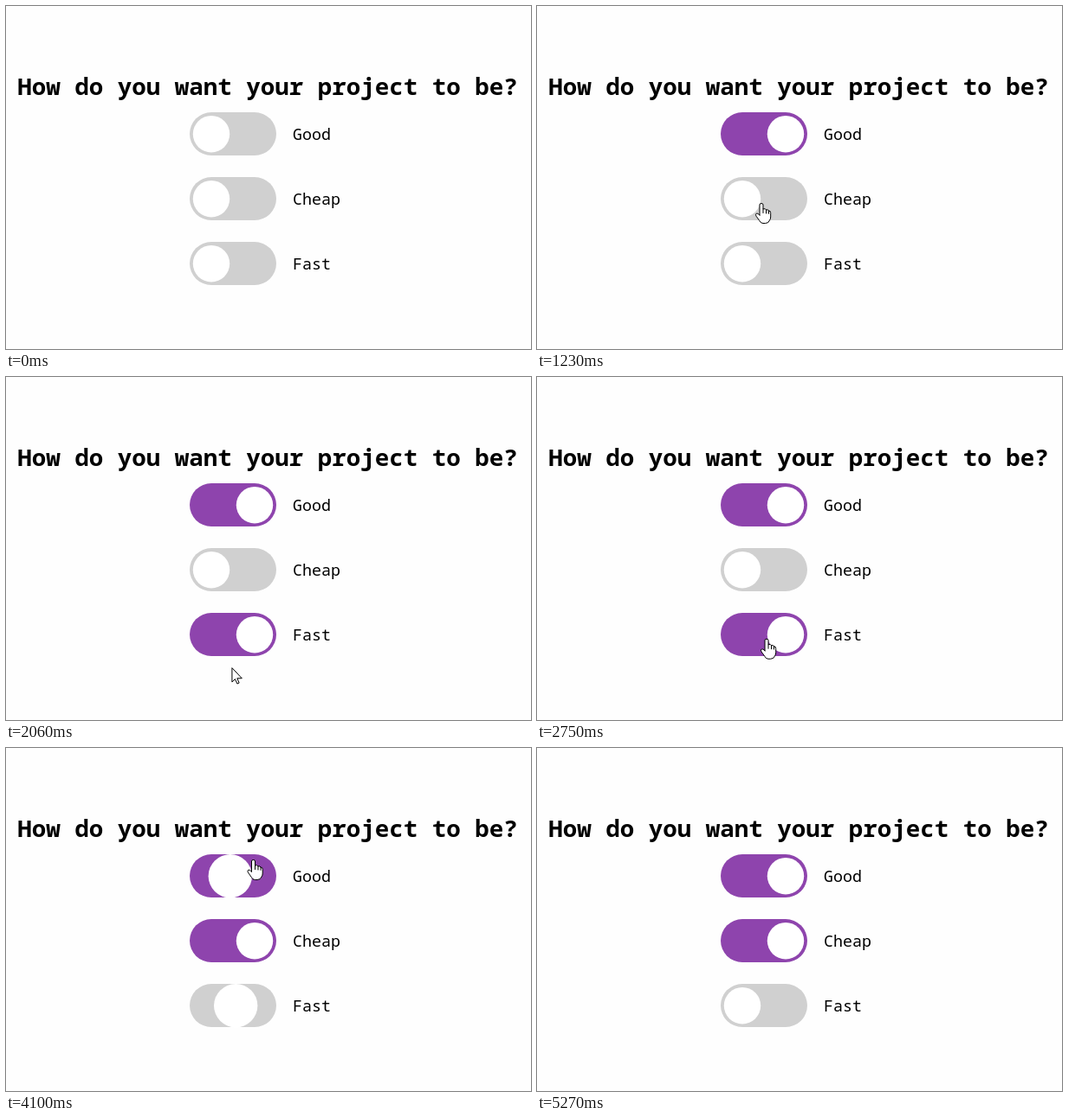
Write an HTML page that moves like this. It is 606 px wide and 397 px high and loops after 5860 ms.

```html
<!DOCTYPE html>
<html lang="en">
<head>
<meta charset="utf-8">
<title>Pick two</title>
<style>
  html, body { margin: 0; width: 100%; height: 100%; overflow: hidden; background: #fefefe; }
  svg { display: block; }
  text { font: 18.33px "Noto Sans Mono", "DejaVu Sans Mono", monospace; }
  .title { font-size: 27.5px; font-weight: 600; }
  #cursor path { fill: #fff; stroke: #000; stroke-linejoin: round; stroke-linecap: round; }
</style>
</head>
<body>
<svg width="606" height="397">
  <text class="title" x="13.2" y="103">How do you want your project to be?</text>
  <g id="toggles"></g>
  <g id="cursor">
    <path id="arrow" d="M.5 .5V16.5L4 13L6.5 18.5L8.7 17.5L6.4 12.2H11.5Z"/>
    <path id="hand" d="M-2 14V2Q-2 .5 0 .5T2 2V7Q4.8 5.8 5.5 8Q8 7 8.5 9.2Q10.7 8.6 10.7 11.5V16
      Q10.7 18.5 9.5 20Q8.5 23.5 4.5 23.5H2Q-1 23.5-2.2 20.5L-6 15.2Q-7.2 13-5.8 12.2Q-4.5 11.3-2 14Z
      M2 7V11.5M5.5 8V12M8.5 9.2V12.3"/>
  </g>
</svg>
<script>
const LOOP = 5860, SLIDE = 300, LEFT = 212, WIDTH = 100, HEIGHT = 50;
const ON = '#8e44ad', OFF = '#d0d0d0';
const $ = id => document.getElementById(id);

function add(tag, attrs) {
  const el = document.createElementNS('http://www.w3.org/2000/svg', tag);
  for (const key in attrs) el.setAttribute(key, attrs[key]);
  return $('toggles').appendChild(el);
}

const toggles = ['Good', 'Cheap', 'Fast'].map((label, i) => {
  const y = 123 + 75 * i;
  const track = add('rect', { x: LEFT, y, width: WIDTH, height: HEIGHT, rx: HEIGHT / 2 });
  const ball = add('circle', { cy: y + HEIGHT / 2 + 0.2, fill: '#fff' });
  add('text', { x: 331, y: y + 32 }).textContent = label;
  return { y, track, ball, flips: [] };
});

// Clicks: time, switch. When all three would be on, the one before the clicked one goes off.
const isOn = s => s.flips.length % 2 === 1;
for (const [time, i] of [[885, 0], [1335, 1], [1757, 2], [3227, 1], [3942, 0]]) {
  toggles[i].flips.push(time);
  if (toggles.every(isOn)) toggles[(i + 2) % 3].flips.push(time);
}

// Pointer moves: leave, arrive, x, y
const moves = [
  [400, 400, 263, 336],
  [400, 800, 264, 152],
  [970, 1230, 259, 228],
  [1370, 1600, 258, 307],
  [1880, 2180, 262, 356],
  [2370, 2750, 265, 303],
  [2750, 3200, 277, 206],
  [3400, 3750, 285.5, 129],
  [4240, 4460, 287, 244],
  [4560, 5250, 560, 396]
];

function drawToggle({ track, ball, flips }, t) {
  const past = flips.filter(time => time <= t);
  const on = past.length % 2 === 1;
  const p = past.length ? Math.min(1, (t - past.at(-1)) / SLIDE) : 1;
  const travel = p < 0.5 ? 40 * p : 60 * p - 10;
  const scale = 1.2 - 0.2 * Math.abs(2 * p - 1);
  track.setAttribute('fill', on ? ON : OFF);
  ball.setAttribute('cx', LEFT + 25 + (on ? travel : 50 - travel));
  ball.setAttribute('r', 21.2 * scale);
}

function drawCursor(t) {
  const visible = t >= moves[0][0] && t < moves.at(-1)[1];
  $('cursor').style.display = visible ? '' : 'none';
  let [, , x, y] = moves[0];
  for (const [leave, arrive, toX, toY] of moves.slice(1)) {
    const k = Math.min(1, Math.max(0, (t - leave) / (arrive - leave)));
    x += (toX - x) * k;
    y += (toY - y) * k;
  }
  const over = x < LEFT + WIDTH && toggles.some(s => y >= s.y && y < s.y + HEIGHT);
  $('hand').style.display = over ? '' : 'none';
  $('arrow').style.display = over ? 'none' : '';
  $('cursor').setAttribute('transform', `translate(${x} ${y})`);
}

const start = performance.now();
function frame() {
  const t = (performance.now() - start) % LOOP;
  toggles.forEach(s => drawToggle(s, t));
  drawCursor(t);
  requestAnimationFrame(frame);
}
frame();
</script>
</body>
</html>
```
